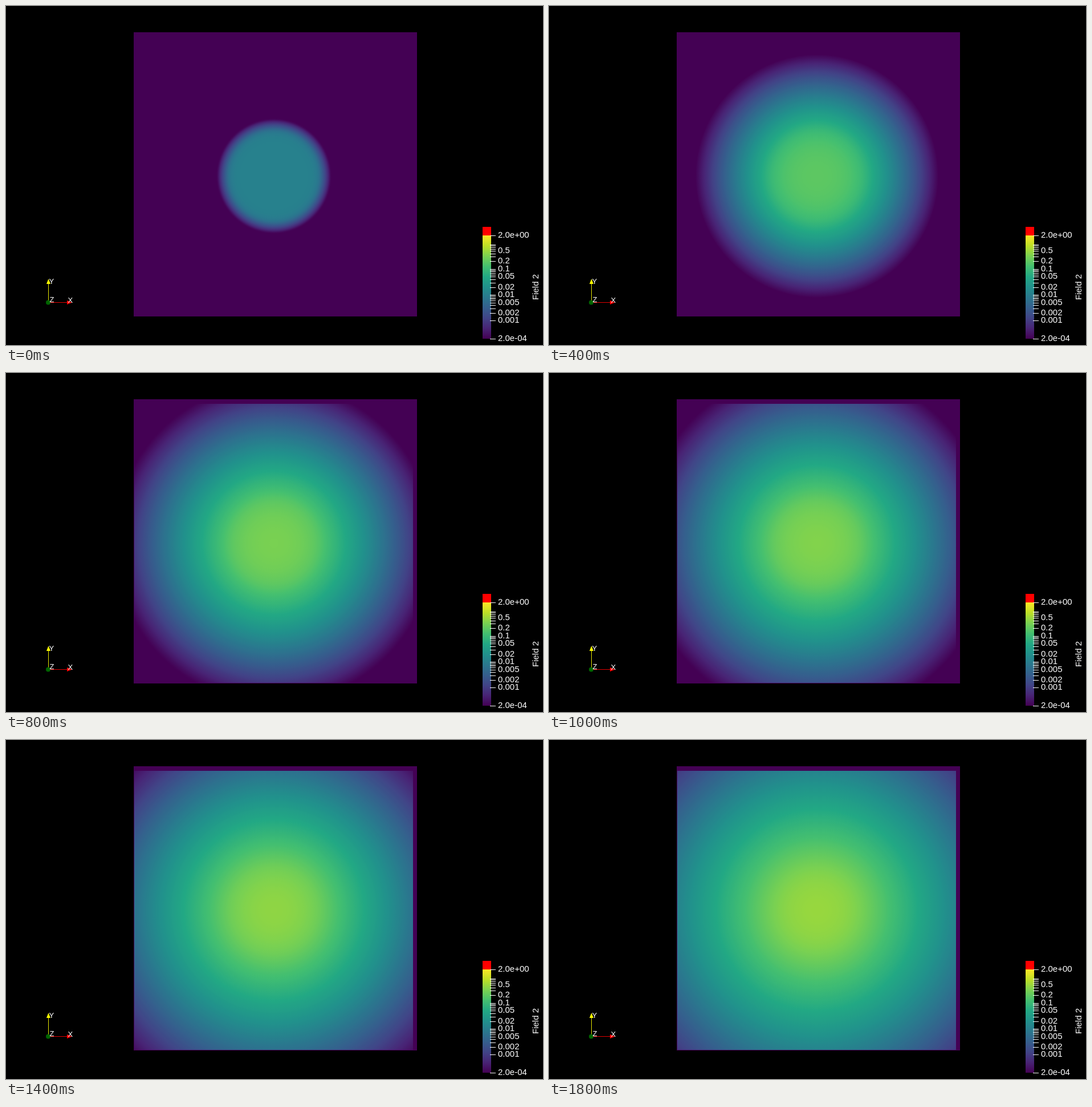
An HTML page with a canvas that plays this animation: 942x594 px, repeating every 2 s.

```html
<!DOCTYPE html>
<html lang="en">
<head>
<meta charset="utf-8">
<title>Diffusion from a disc</title>
<style>
  html, body { margin: 0; height: 100%; overflow: hidden; background: #000; }
  canvas { display: block; }
</style>
</head>
<body>
<canvas id="stage" width="942" height="594"></canvas>
<script>
const ctx = document.getElementById('stage').getContext('2d');
const FRAMES = 10, FRAME_MS = 200;
const MIN = 2e-4, DECADES = 4;
const PALETTE = ['440154', '482475', '414487', '355f8d', '2a788e', '21918c',
                 '22a884', '44bf70', '7ad151', 'bddf26', 'fde725']
  .map(hex => [0, 2, 4].map(i => parseInt(hex.slice(i, i + 2), 16)));

// Position of a value on the logarithmic colour scale, 0..1
const level = v => Math.min(1, Math.max(0, Math.log10(Math.max(v, MIN) / MIN) / DECADES));

function color(k) {
  const x = k * (PALETTE.length - 1), i = Math.min(Math.floor(x), PALETTE.length - 2);
  return `rgb(${PALETTE[i].map((c, j) => Math.round(c + (PALETTE[i + 1][j] - c) * (x - i)))})`;
}

// Radial diffusion with a constant disc-shaped source; time unit is one frame
function simulate() {
  const dr = 2, cells = 280, dt = 0.001, rate = 0.111, radius = 81, k = 750 * dt / (dr * dr);
  const u = new Float64Array(cells), profiles = [];
  for (let step = 1; step <= (FRAMES - 1) * 1000; step++) {
    let inflow = 0;
    for (let i = 0; i < cells; i++) {
      const next = i + 1 < cells ? u[i + 1] : 0;
      const outflow = (i + 1) * k * (u[i] - next);
      const source = Math.min(1, Math.max(0, radius / dr - i)) * rate * dt;
      u[i] += (inflow - outflow) / (i + 0.5) + source;
      inflow = outflow;
    }
    if (step === 100 || step % 1000 === 0) profiles.push(u.slice());
  }
  return profiles;
}

const REACH = 352;
const fields = simulate().map(u => {
  const g = ctx.createRadialGradient(470, 298, 0, 470, 298, REACH);
  for (let i = 0; i < REACH / 2; i++) g.addColorStop((2 * i + 1) / REACH, color(level(u[i])));
  return g;
});

function rect(fill, x, y, w, h) {
  ctx.fillStyle = fill;
  ctx.fillRect(x, y, w, h);
}

function text(s, x, y, size = 15) {
  ctx.font = `${size}px "Liberation Sans", Arial, sans-serif`;
  ctx.fillStyle = '#fff';
  ctx.fillText(s, x, y);
}

function triangle(fill, ...points) {
  ctx.fillStyle = fill;
  ctx.beginPath();
  points.forEach(p => ctx.lineTo(...p));
  ctx.fill();
}

function drawAxes() {
  rect('#e6e600', 74, 486, 1, 32);
  triangle('#ff0', [74.5, 478], [78, 487], [71, 487]);
  rect('#d00', 76, 519, 33, 1);
  triangle('#f00', [116, 519.5], [107, 523], [107, 516]);
  ctx.fillStyle = '#006400';
  ctx.beginPath();
  ctx.arc(74, 519.5, 4, 0, 7);
  ctx.fill();
  text('Y', 75.5, 487, 13);
  text('X', 108.5, 520, 13);
  text('Z', 76.5, 519, 13);
}

const SCALE_TOP = 402, SCALE_H = 181;
const scaleY = v => SCALE_TOP + SCALE_H * (1 - level(v));
const scale = ctx.createLinearGradient(0, SCALE_TOP, 0, SCALE_TOP + SCALE_H);
for (let i = 0; i <= 10; i++) scale.addColorStop(i / 10, color(1 - i / 10));

function drawLegend() {
  rect(scale, 836, SCALE_TOP, 15, SCALE_H);
  rect('#f00', 836, 387, 15, 15);
  const tick = v => rect('#fff', 849, Math.round(scaleY(v)), 10, 1);
  for (const base of [0.001, 0.01, 0.1])
    for (let m = 1; m < 10; m++) tick(m * base);
  const label = (v, s) => text(s, 863, Math.round(scaleY(v)) + 4);
  for (const v of [0.5, 0.2, 0.1, 0.05, 0.02, 0.01, 0.005, 0.002, 0.001]) label(v, String(v));
  for (const [v, s] of [[2, '2.0e+00'], [MIN, '2.0e-04']]) {
    tick(v);
    label(v, s);
  }
  ctx.save();
  ctx.translate(934, 515);
  ctx.rotate(-Math.PI / 2);
  text('Field 2', 0, 0);
  ctx.restore();
}

let shown = -1;
function draw(now) {
  const frame = Math.floor(now / FRAME_MS) % FRAMES;
  if (frame !== shown) {
    shown = frame;
    rect('#000', 0, 0, 942, 594);
    rect(color(0), 224, 46, 497, 498);
    rect(fields[frame], 225, 54, 489, 489);
    drawAxes();
    drawLegend();
  }
  requestAnimationFrame(draw);
}
draw(0);
</script>
</body>
</html>
```
